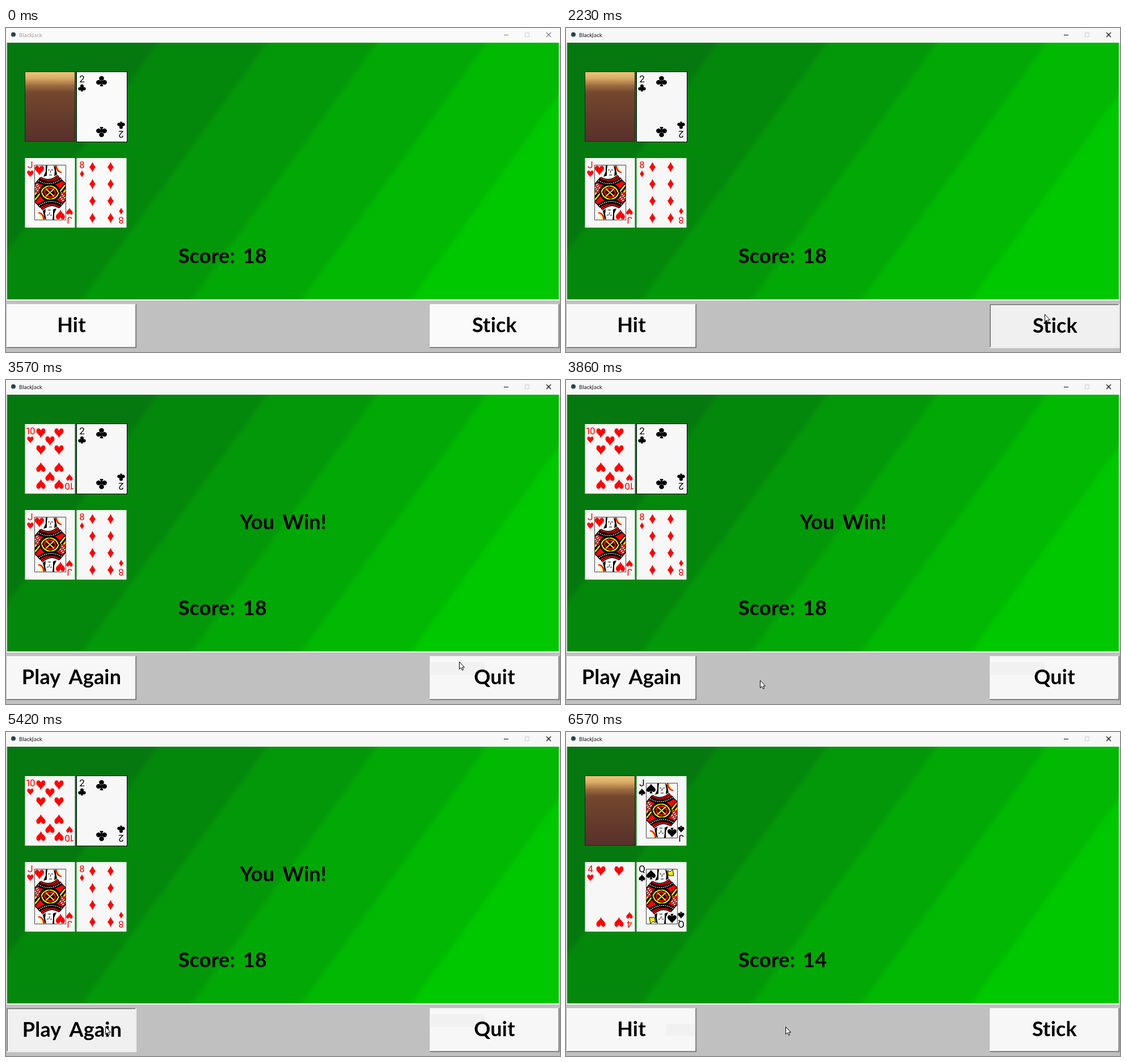
These frames come from a looping animation (977x573 px, 8000 ms). An HTML page with a canvas:

```html
<!DOCTYPE html>
<html lang="en">
<head>
<meta charset="utf-8">
<title>BlackJack</title>
<style>
html, body { margin: 0; width: 100%; height: 100%; overflow: hidden; }
canvas { display: block; }
</style>
</head>
<body>
<canvas width="977" height="573"></canvas>
<script>
const c = document.querySelector('canvas').getContext('2d');
const LOOP = 8000, PRESS_STICK = 2230, REVEAL = 2480, PRESS_AGAIN = 5420, DEAL = 5730;
const RED = '#fb0505', YELLOW = '#f5ee10';

// Pointer tip: time, x, y
const pointer = [
  [1180, 718, 559], [1238, 750, 540], [1296, 784, 524], [1354, 816, 512], [1412, 838, 508], [1470, 845, 507],
  [3570, 800, 499], [3628, 700, 505], [3686, 560, 516], [3744, 440, 526], [3802, 365, 531], [3860, 343, 532],
  [4700, 290, 529], [4760, 235, 526], [4820, 190, 523], [4880, 176, 522],
  [6460, 225, 516], [6515, 330, 518], [6570, 388, 522]
];

// Hover tint left behind the pointer: start, end, x, y, w, h
const tints = [
  [1296, PRESS_STICK, 750, 541, 45, 16], [1296, PRESS_STICK, 755, 525, 33, 16],
  [1354, PRESS_STICK, 787, 512, 46, 27], [1470, PRESS_STICK, 816, 507, 38, 18],
  [3570, DEAL, 749, 499, 95, 22], [6460, LOOP, 176, 516, 52, 21]
];

const HEART = 'M0 .5C-.1 .2-.5 .05-.5-.22C-.5-.57-.1-.6 0-.27C.1-.6 .5-.57 .5-.22C.5 .05 .1 .2 0 .5Z';
const suits = {
  heart: { color: RED, w: 16, h: 17, d: HEART },
  diamond: { color: RED, w: 11, h: 18, d: 'M0-.5Q.2-.2 .5 0Q.2 .2 0 .5Q-.2 .2-.5 0Q-.2-.2 0-.5Z' },
  spade: { color: '#000', w: 16, h: 17,
    d: 'M0-.5C.1-.25 .5-.1 .5 .13C.5 .42 .15 .4 .04 .2L.16 .5H-.16L-.04 .2C-.15 .4-.5 .42-.5 .13C-.5-.1-.1-.25 0-.5Z' },
  club: { color: '#000', w: 19, h: 18,
    d: 'M-.23-.27a.23 .23 0 1 1 .46 0a.23 .23 0 0 1-.46 0ZM-.5 .12a.23 .23 0 1 1 .46 0a.23 .23 0 0 1-.46 0Z' +
       'M.04 .12a.23 .23 0 1 1 .46 0a.23 .23 0 0 1-.46 0ZM-.06-.1H.06V.25L.17 .5H-.17L-.06 .25Z' }
};
const L = 28.5, M = 44.5, R = 60.5;
const twoRows = [[L, 17], [R, 17], [L, 47], [R, 47]];

function rect(color, x, y, w, h) {
  c.fillStyle = color;
  c.fillRect(x, y, w, h);
}

function fill(color, d) {
  c.fillStyle = color;
  c.fill(new Path2D(d));
}

function line(color, width, d, dash = []) {
  c.strokeStyle = color;
  c.lineWidth = width;
  c.setLineDash(dash);
  c.stroke(new Path2D(d));
  c.setLineDash([]);
}

function text(str, x, y, font, { color = '#000', align = 'center', spacing = 0 } = {}) {
  c.font = font;
  c.fillStyle = color;
  c.textAlign = align;
  c.letterSpacing = spacing + 'px';
  c.fillText(str, x, y);
}

function label(str, x, y) {
  c.wordSpacing = '5px';
  // Non-zero spacing also turns ligatures off
  text(str, x, y, '700 36px Lato, sans-serif', { spacing: .2 });
  c.wordSpacing = '0px';
}

function pip(suit, x, y, scale = 1) {
  const s = suits[suit];
  c.save();
  c.translate(x, y);
  c.scale(s.w * scale, s.h * scale);
  fill(s.color, s.d);
  c.restore();
}

function courtHalf(rank) {
  c.save();
  c.beginPath();
  c.rect(17, 14, 55, 48.2);
  c.clip();
  // Robe
  fill(RED, 'M17 48L28 35Q44 46 58 33L72 46V63H17Z');
  line('#000', 1.5, 'M17 48L28 35M58 33L72 46');
  line('#fff', 3, 'M17 51L26 63M20 46L27 55');
  line('#000', 3, 'M17 51L26 63M20 46L27 55', [1.5, 2]);
  line('#000', 8, 'M72 49L60 64');
  line(YELLOW, 2.5, 'M71 49L60 63M73 56L67 64');
  // Front
  fill('#000', 'M25 63Q27 47 44 46Q61 47 63 63Z');
  line(YELLOW, 2, 'M29 63Q31 52 44 50Q57 52 59 63');
  line(RED, 2.5, 'M34 63Q36 55 44 54Q52 55 54 63');
  line(YELLOW, 2, 'M37 55L52 69M52 55L37 69');
  // Collar
  line('#000', 7, 'M24 41Q44 53 65 38');
  line('#fff', 1.5, 'M24 41Q44 53 65 38', [1.6, 1.8]);
  line('#000', 4, 'M28 36Q44 46 59 32');
  line(RED, 2, 'M28 36Q44 46 59 32');
  // Hair and face lines
  fill('#000', 'M37 14H40L39 22L39 32L33 34L37 25ZM51 14L54 16L57 30L52 33L53 24Z');
  line('#000', 1, 'M41 22H44M47 22H50M46 23L45 27M43 31H48');
  if (rank === 'Q') {
    fill(YELLOW, 'M55 16L60 18L64 14L66 25L57 25Z');
    line('#000', 1, 'M55 16L60 18L64 14L66 25L57 25Z');
  } else {
    line(RED, 2.5, 'M55 14Q57 26 65 26');
    line(YELLOW, 1.5, 'M57 14Q58 22 64 25');
  }
  c.restore();
}

function cardHalf(rank, suit, pips) {
  if (pips) {
    pips.forEach(([x, y]) => pip(suit, x, y));
  } else {
    courtHalf(rank);
    pip(suit, 26, 23);
  }
  const spacing = rank.length > 1 ? -2 : 0;
  text(rank, 10 + spacing / 2, 19, '17px Roboto, sans-serif', { color: suits[suit].color, spacing });
  pip(suit, 10, 29, .7);
}

function card(x, y, white, rank, suit, pips, edge) {
  c.save();
  c.translate(x, y);
  if (edge) rect(edge, 0, 0, 90, 125);
  rect(white, edge ? 1 : .5, 1, 88, 123);
  for (let i = 0; i < 2; i++) {
    cardHalf(rank, suit, pips);
    c.translate(89, 124);
    c.rotate(Math.PI);
  }
  if (!pips) line('#444', 1, 'M17.5 13.5H72.5V110.5H17.5Z');
  c.restore();
}

function cardBack(x, y) {
  const g = c.createLinearGradient(0, y, 0, y + 124);
  [[0, '#edca7a'], [.1, '#d8aa66'], [.2, '#9d6b42'], [.3, '#74482e'], [.65, '#653c2c'], [1, '#57302b']]
    .forEach(s => g.addColorStop(...s));
  rect('#1c2a10', x, y, 89, 124);
  rect(g, x + 1, y + 1, 87, 122);
}

// Draws the bevelled face and returns a function that draws its label
function button(x, str, pressed, white) {
  const y = 488, w = 229, h = 78, d = pressed ? 1 : 0;
  const edges = pressed ? ['#fff', '#a0a0a0', '#e3e3e3', '#696969'] : ['#696969', '#e3e3e3', '#a0a0a0', '#fff'];
  rect(edges[0], x, y, w, h);
  rect(edges[1], x, y, w - 1, h - 1);
  rect(edges[2], x + 1, y + 1, w - 2, h - 2);
  rect(edges[3], x + 1, y + 1, w - 3, h - 3);
  rect(pressed ? '#f0f0f0' : white, x + 2, y + 2, w - 4, h - 4);
  return () => label(str, x + 114.5 + d, 538 + d);
}

// Diagonal bands of green
const table = c.createLinearGradient(0, 26, 858, 643);
for (let i = 0; i < 6; i++) {
  const color = `rgb(${5 - i},${120 + i * 16},${15 - i * 3})`;
  const at = s => Math.min(1, Math.max(0, s / 1302));
  table.addColorStop(at(i ? 268 + 193.3 * (i - 1) + 7 : 0), color);
  table.addColorStop(at(268 + 193.3 * i - 7), color);
}

function titleBar(active, white) {
  const ink = active ? '#000' : '#777';
  rect(white, 0, 0, 977, 26);
  c.fillStyle = '#2f4052';
  c.beginPath();
  c.arc(13, 11.5, 4, 0, 7);
  c.fill();
  text('BlackJack', 23, 16, '9.5px "Open Sans", sans-serif', { color: active ? '#000' : '#999', align: 'left' });
  line(ink, 1, 'M878 12.5H886');
  line('#ccc', 1, 'M915.5 8.5H922.5V15.5H915.5Z');
  line(ink, 1.1, 'M953 8L961 16M961 8L953 16');
}

function arrow(x, y) {
  c.save();
  c.translate(x - .5, y - .5);
  const d = 'M0 0V13L3 10.3L5.2 14.8L7.2 13.8L5.2 9.6H9Z';
  fill('#fff', d);
  line('#000', 1, d);
  c.restore();
}

function draw(t) {
  const white = t < PRESS_STICK ? '#fafafa' : '#f7f7f7';
  const won = t >= REVEAL && t < DEAL, dealt = t >= DEAL;

  rect('#c0c0c0', 0, 0, 977, 573);
  titleBar(t >= PRESS_STICK, white);
  rect(white, 1, 25, 975, 457);
  rect(table, 2, 26, 973, 454);

  if (won) card(33, 77, white, '10', 'heart', [...twoRows, [M, 31]]);
  else cardBack(33, 77);
  if (dealt) {
    card(124, 77, white, 'J', 'spade');
    card(33, 229, white, '4', 'heart', twoRows.slice(0, 2));
    card(124, 229, white, 'Q', 'spade');
  } else {
    card(124, 77, white, '2', 'club', [[M, 17]], '#000');
    card(33, 229, white, 'J', 'heart');
    card(124, 229, white, '8', 'diamond', twoRows);
  }
  label(dealt ? 'Score: 14' : 'Score: 18', 382, 416);
  if (won) label('You Win!', 489, 264);

  const labels = [
    button(1, won ? 'Play Again' : 'Hit', t >= PRESS_AGAIN && t < DEAL, white),
    button(747, won ? 'Quit' : 'Stick', t >= PRESS_STICK && t < REVEAL, white)
  ];
  for (const [from, to, ...box] of tints) {
    if (t >= from && t < to) rect('#f1f1f1', ...box);
  }
  labels.forEach(show => show());

  const tip = pointer.filter(p => p[0] <= t).pop();
  if (tip) arrow(tip[1], tip[2]);
}

const start = performance.now();
function frame() {
  draw((performance.now() - start) % LOOP);
  requestAnimationFrame(frame);
}
frame();
</script>
</body>
</html>
```
